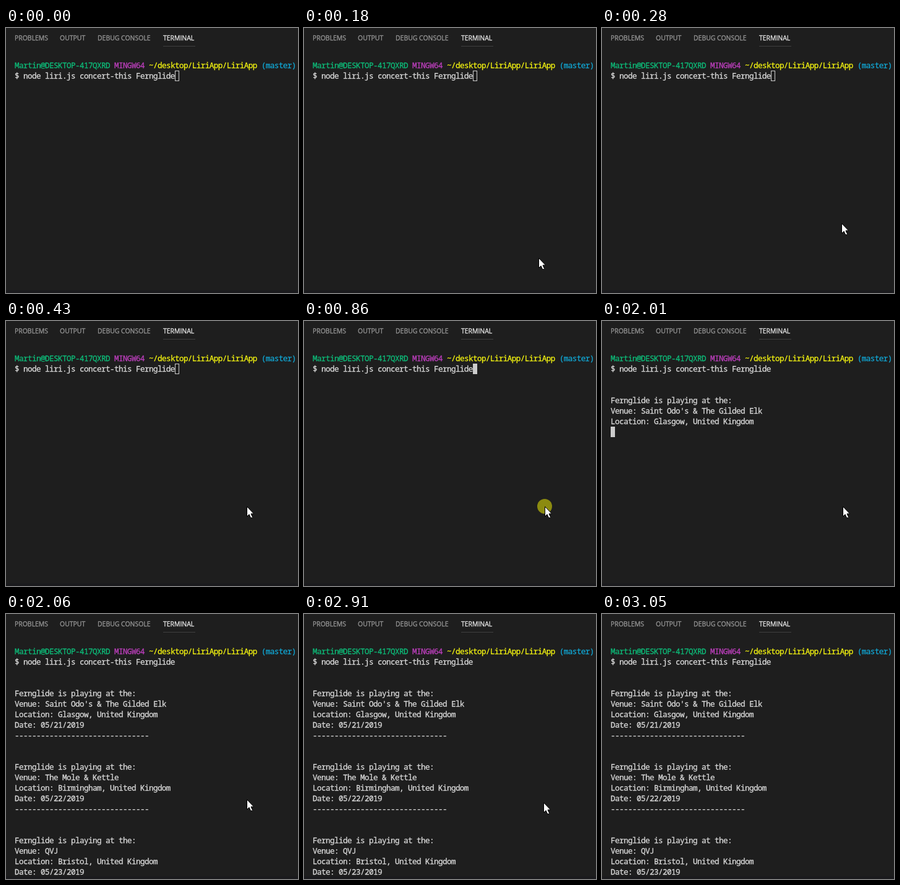
Write an HTML page that moves like this. It is 472x429 px and loops after 3.71 s.

```html
<!DOCTYPE html>
<html lang="en">
<head>
<meta charset="utf-8">
<title>Terminal</title>
<style>
html, body { margin: 0; width: 100%; height: 100%; overflow: hidden; background: #1e1e1e; }
#stage { position: relative; width: 472px; height: 429px; overflow: hidden; background: #1e1e1e; }
#stage > * { position: absolute; }
nav, pre { -webkit-text-stroke: .3px; }
nav { left: 14px; top: 0; font: 10.45px/32px "Open Sans", "Noto Sans", sans-serif; color: #989898; }
nav span { position: absolute; white-space: nowrap; }
nav .active { color: #e7e7e7; }
#underline { left: 254px; top: 29px; width: 52px; height: 1px; background: #404040; }
#footer { left: 0; top: 425px; width: 472px; height: 4px; background: #1a1a1d; }
pre { left: 14px; top: 52px; margin: 0; color: #dadada; font: 12.6px/17px "Noto Sans Mono", monospace; letter-spacing: -.56px; }
.user { color: #0dbc79; }
.system { color: #bc3fbc; }
.path { color: #f5f510; }
.branch { color: #11a8d6; }
#caret { box-sizing: border-box; width: 7px; height: 17px; border: 1px solid #ccc; }
#pointer { left: 0; top: 0; }
</style>
</head>
<body>
<div id="stage">
  <nav>
    <span style="left:0">PROBLEMS</span>
    <span style="left:73px">OUTPUT</span>
    <span style="left:134px">DEBUG CONSOLE</span>
    <span style="left:240px" class="active">TERMINAL</span>
  </nav>
  <div id="underline"></div>
  <div id="footer"></div>
  <pre><span class="user">Martin@DESKTOP-417QXRD</span> <span class="system">MINGW64</span> <span class="path">~/desktop/LiriApp/LiriApp</span> <span class="branch">(master)</span>
$ node liri.js concert-this Fernglide
<span id="output"></span></pre>
  <div id="caret"></div>
  <svg id="pointer" width="472" height="429">
    <circle id="click" cx="389" cy="300" r="12" fill="#8c8b10"/>
    <path id="arrow" d="M0 0V16L3.5 12.5L6 18H8L9 17L6.5 11.5H11Z" fill="#fff" stroke="#000" stroke-linejoin="round"/>
  </svg>
</div>
<script>
const LOOP = 3710;
const REST = { x: 389.5, y: 300.5 };
const [output, caret, click, arrow] =
  ["output", "caret", "click", "arrow"].map(id => document.getElementById(id));

const shows = [
  ["Saint Odo's & The Gilded Elk", "Glasgow", 21],
  ["The Mole & Kettle", "Birmingham", 22],
  ["QVJ", "Bristol", 23],
];
const lines = shows.flatMap(([venue, city, day]) => [
  "", "",
  "Fernglide is playing at the:",
  `Venue: ${venue}`,
  `Location: ${city}, United Kingdom`,
  `Date: 05/${day}/2019`,
  "-".repeat(31),
]);

function pointerAt(t) {
  if (t < 130 || t >= 3050) return null;
  if (t < 430) {
    const left = (1 - Math.floor((t - 130) / 25) / 12) ** 3;
    return { x: REST.x - Math.round(18 * left), y: REST.y + Math.round(124 * left) };
  }
  if (t < 2910) return REST;
  const u = (Math.floor((t - 2910) / 23.4) + 1) / 6;
  return { x: REST.x - Math.round(24 * u ** 1.4), y: REST.y + Math.round(124 * u ** 1.8) };
}

function render(t) {
  const printed = t < 2010 ? 0 : t < 2060 ? 5 : lines.length;
  const text = lines.slice(0, printed).join("\n");
  if (output.textContent !== text) output.textContent = text;

  const typing = t < 1380;
  caret.style.left = (typing ? 273 : 14) + "px";
  caret.style.top = 52 + 17 * (typing ? 1 : 2 + printed) + "px";
  caret.style.background = t < 860 ? "none" : "#ccc";

  click.style.display = t >= 860 && t < 910 ? "" : "none";
  const p = pointerAt(t);
  arrow.style.display = p ? "" : "none";
  if (p) arrow.setAttribute("transform", `translate(${p.x} ${p.y})`);
}

const start = performance.now();
function tick() {
  render((performance.now() - start) % LOOP);
  requestAnimationFrame(tick);
}
tick();
</script>
</body>
</html>
```
